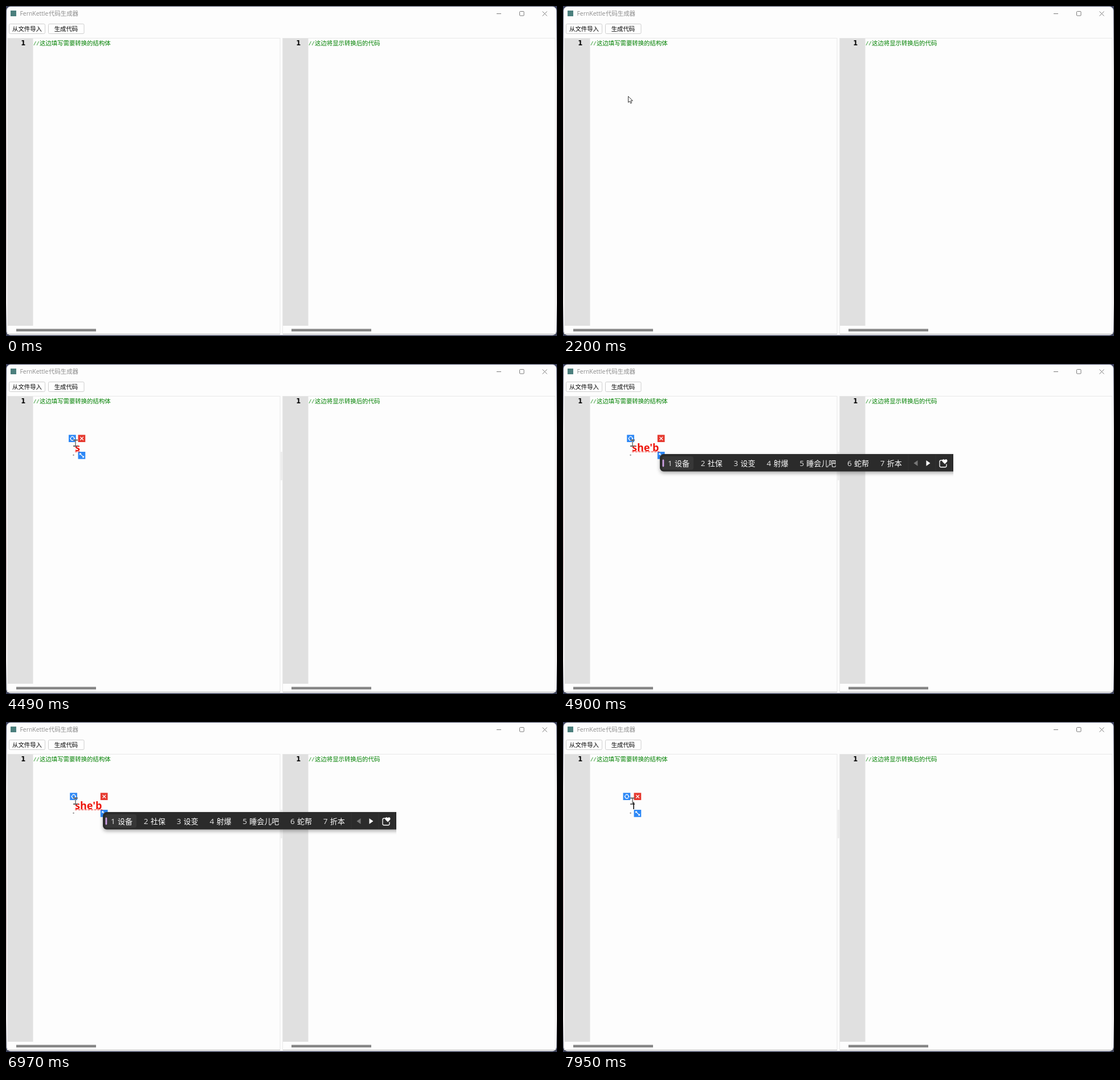
Write an HTML page that moves like this. It is 967 by 579 pixels and loops after 8 s.

```html
<!DOCTYPE html>
<html lang="zh-CN">
<head>
<meta charset="utf-8">
<title>代码生成器</title>
<style>
  html, body { margin: 0; width: 100%; height: 100%; overflow: hidden; background: #3a3f58; }
  svg { display: block; width: 100vw; height: 100vh; }
  text { font-family: "Noto Sans CJK SC", "Noto Sans CJK", sans-serif; font-size: 10.4px; white-space: pre; }
  .latin { font-family: "Open Sans", sans-serif; }
  .title { fill: #8c8c8c; }
  .button { fill: #fefefe; stroke: #cfcfcf; }
  .line { font: bold 11.5px "DejaVu Sans", sans-serif; }
  .comment { fill: #008000; }
  .slashes { font-family: "Liberation Mono", monospace; font-size: 8.8px; }
  .chrome { fill: none; stroke: #7c7c7c; }
  .typed { font: bold 18px "Noto Sans", sans-serif; fill: #ee150c; }
  .icon { fill: none; stroke: #fff; stroke-width: 1.3; }
  #bar { filter: drop-shadow(0 3px 3px rgba(0, 0, 0, .32)); }
  #bar text { fill: #fff; font-size: 13px; }
  #bar .latin { font-size: 13.5px; fill: #e4e4e4; }
</style>
</head>
<body>
<svg viewBox="0 0 967 579" preserveAspectRatio="none">
  <defs>
    <linearGradient id="edge" x2="0" y2="1">
      <stop offset="0" stop-color="#3c415c"/>
      <stop offset=".2" stop-color="#c9c2c4"/>
      <stop offset=".6" stop-color="#a98f93"/>
      <stop offset=".9" stop-color="#d8d0d2"/>
      <stop offset="1" stop-color="#33384c"/>
    </linearGradient>
    <clipPath id="cut"><rect width="685" height="579"/></clipPath>
    <g id="panel">
      <rect x="2.5" y="56.5" width="478.5" height="519" fill="#fdfdfd" stroke="#e9e9e9"/>
      <rect x="3" y="57" width="44.5" height="504" fill="#e0e0e0"/>
      <rect x="18" y="566.5" width="140" height="4.5" fill="#868686"/>
      <path d="M3 575.5H481" stroke="#b5b5b5"/>
      <text class="line" x="26.3" y="69">1</text>
      <text class="comment slashes" x="48" y="68.5">//</text>
    </g>
  </defs>

  <rect width="967" height="579" fill="url(#edge)"/>
  <path d="M0 .5H967M0 578H967" stroke="#3a3f58" stroke-width="2"/>
  <rect x="1" y="1" width="965" height="576.5" rx="7" fill="#fdfdfd"/>

  <rect x="8" y="8" width="10" height="10" fill="#4b7f7d"/>
  <text class="title latin" x="24.5" y="16.7">FernKettle</text>
  <text class="title" x="75" y="16.7">代码生成器</text>
  <path class="chrome" d="M861 13.5h8M941.5 9.5l8 8m0-8l-8 8"/>
  <rect class="chrome" x="901.5" y="9.5" width="7.5" height="7.5" rx="1"/>

  <rect class="button" x="5.5" y="31.5" width="63" height="17" rx="2"/>
  <text x="11" y="44">从文件导入</text>
  <rect class="button" x="74.5" y="31.5" width="62.5" height="17" rx="2"/>
  <text x="84.7" y="44">生成代码</text>

  <use href="#panel"/>
  <use href="#panel" x="483"/>
  <path id="smudge" d="M483.7 154V204" stroke="#ededed" stroke-width="4"/>
  <text class="comment" x="59" y="69">这边填写需要转换的结构体</text>
  <text class="comment" x="542" y="69">这边将显示转换后的代码</text>

  <g id="editor">
    <rect x="117.5" y="159" width="2" height="1.4" fill="#555"/>
    <g id="rotate">
      <rect x="-6.5" y="124.3" width="12.7" height="12.7" fill="#2d88f6"/>
      <circle class="icon" cy="130.7" r="3.3" stroke-dasharray="8 2.4" transform="rotate(35 0 130.7)"/>
      <path d="M-4.6 129.5h3l-2 2.4zM4.6 132h-3l2-2.4z" fill="#fff"/>
    </g>
    <g id="corner">
      <rect x="-6.5" y="124.3" width="12.7" height="12.7" fill="#e63a30"/>
      <path class="icon" d="M-2.8 127.9l5.6 5.6m0-5.6l-5.6 5.6"/>
      <rect x="-6.5" y="154" width="12.7" height="12.7" fill="#2d88f6"/>
      <path class="icon" d="M-2.8 157.5l5.6 5.6"/>
      <path d="M-4 156.4h3.5l-3.5 3.5zM4 164.2h-3.5l3.5-3.5z" fill="#fff"/>
    </g>
    <text id="typed" class="typed" x="121" y="152.5"></text>
    <path id="underline" stroke="#ee150c" stroke-width="1.2" stroke-dasharray="4 1.6"/>
    <path d="M118 133.5h8M122 133.5v10.5M118 144h8" fill="none" stroke="#666" stroke-width="1.8"/>
    <path d="M122 135v8" stroke="#ccc" stroke-width=".7"/>
    <path id="caret" d="M124 140.5v12.5" stroke="#000" stroke-width="1.5"/>
  </g>

  <g id="barClip"><g id="bar"></g></g>

  <path id="pointer" d="M.5.5V11.2L3 8.9 4.7 12.8 6.6 12 4.9 8.2H8.3Z"
        fill="#fff" stroke="#222" stroke-width=".9"/>
</svg>

<script>
const LOOP = 8000;
const $ = id => document.getElementById(id);
const show = (id, on) => $(id).setAttribute("display", on ? "inline" : "none");
const moveTo = (id, x, y = 0) => $(id).setAttribute("transform", `translate(${x} ${y})`);

// Pointer path: time, x, y
const path = [
  [500, 686, 566], [600, 645, 540], [700, 558, 483], [800, 450, 410],
  [900, 362, 347], [1000, 315, 306], [1100, 277, 271], [1300, 238, 237],
  [1600, 195, 206], [1900, 138, 175], [2200, 114, 158],
  [2500, 113, 154], [3000, 118, 141]
];

// Typed text: corner handle x, candidate words
const words = {
  "": { corner: 131 },
  "s": { corner: 133, list: "是 上 说 三 时 所 岁" },
  "sh": { corner: 142.5, list: "是 上 说 时 谁 事 手" },
  "she": { corner: 153.7, list: "设 社 射 蛇 舍 摄 涉" },
  "she'b": { corner: 172.3, list: "设备 社保 设变 射爆 睡会儿吧 蛇帮 折本" },
  "she'bi": { corner: 176.5, list: "设闭 蛇币 射臂 舍笔 设 社 蛇" },
  "she'bia": { corner: 188.3, list: "设变 蛇鞭 舍标 涉笔 设 社 蛇" },
  "she'bian": { corner: 200.3, list: "设变 蛇鞭 舍边 射边 设 社 蛇" }
};

// Editor states: time, text, bar left, bar right, extra
const states = [
  [3130, "", 0, 0, "caret"], [3560, ""],
  [4460, "s"], [4510, "s", 141, 648], [4570, "sh", 141, 648],
  [4750, "she", 141, 648],
  [4900, "she'b", 170, 707, "cut"], [5000, "she'b", 170, 707],
  [5310, "she'bi", 175, 683],
  [5620, "she'bia", 187, 695],
  [5830, "she'bian", 199, 704],
  [6430, "she'bia", 187, 695],
  [6710, "she'bi", 175, 683],
  [6970, "she'b", 170, 707, "cut"], [7070, "she'b", 170, 707],
  [7220, "she", 152, 658],
  [7500, "sh", 141, 648], [7650, "s", 141, 648],
  [7850, ""], [7950, "", 0, 0, "caret"]
];

function barMarkup(left, right, list) {
  let x = left + 14;
  const items = list.split(" ").map((word, i) => {
    const item = `<text class="latin" x="${x}" y="179">${i + 1}</text>` +
      `<text x="${x + 12}" y="178.8">${word}</text>`;
    x += 31.8 + 13 * Math.max(2, word.length);
    return item;
  }).join("");
  const rule = dx => `M${right - dx} 159v28`;
  return `
    <rect x="${left}" y="158" width="${right - left}" height="30.5" rx="6.5" fill="#2b2b2b"/>
    <rect x="${left + 4}" y="162" width="55" height="23.5" rx="4" fill="#373737"/>
    <rect x="${left + 4.5}" y="167.5" width="2.8" height="13" rx="1.4" fill="#cda0e4"/>
    ${items}
    <path d="${rule(101)}${rule(53)}${rule(26)}" stroke="#333"/>
    <g transform="translate(${right} 174)">
      <path d="M-91.5 0l7-5v10z" fill="#777"/>
      <path d="M-62.5 0l-7-5v10z" fill="#fff"/>
      <path class="icon" d="M-40-5h-3.5q-2.5 0-2.5 2.5v7q0 2.5 2.5 2.5h7q2.5 0 2.5-2.5v-3"/>
      <path d="M-37 1.5l-4-4c-2-3 2-6 4-3 2-3 6 0 4 3z" fill="#fff"/>
      <path class="icon" d="M-18.5-1.5l5.3 5.3 5.3-5.3"/>
    </g>`;
}

function drawState(state) {
  show("editor", state);
  show("smudge", state && state[0] >= 4460);
  show("barClip", state && state[2]);
  if (!state) return;
  const [, text, left, right, extra] = state;
  const { corner, list } = words[text];
  moveTo("rotate", text === "" ? 112 : text === "s" ? 116.5 : 118.7);
  moveTo("corner", corner);
  $("typed").textContent = text;
  $("underline").setAttribute("d", text ? `M121 154H${corner - 3}` : "");
  show("caret", extra === "caret");
  if (!left) return;
  $("bar").innerHTML = barMarkup(left, right, list);
  if (extra === "cut") $("barClip").setAttribute("clip-path", "url(#cut)");
  else $("barClip").removeAttribute("clip-path");
}

function drawPointer(t) {
  const visible = t >= 500 && t < 3130;
  show("pointer", visible);
  if (!visible) return;
  const now = Math.min(Math.floor(t / 100) * 100, 3000);
  const next = Math.max(1, path.findIndex(p => p[0] >= now));
  const [t0, x0, y0] = path[next - 1], [t1, x1, y1] = path[next];
  const k = (now - t0) / (t1 - t0);
  moveTo("pointer", Math.round(x0 + (x1 - x0) * k), Math.round(y0 + (y1 - y0) * k));
}

const start = performance.now();
let current;
function frame() {
  const t = (performance.now() - start) % LOOP;
  const state = states.filter(s => s[0] <= t).pop() || null;
  if (state !== current) drawState(current = state);
  drawPointer(t);
  requestAnimationFrame(frame);
}
frame();
</script>
</body>
</html>
```
